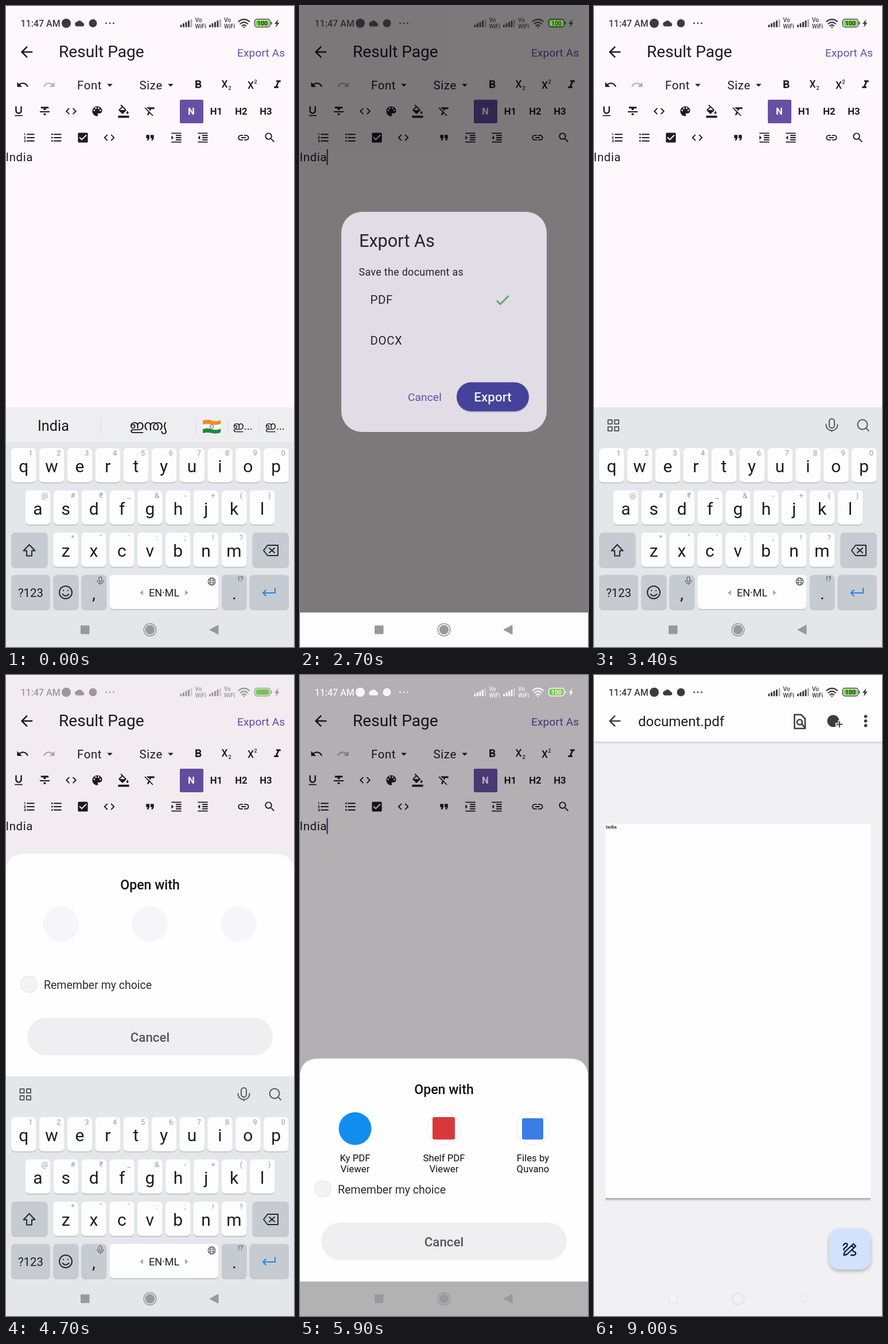
These frames come from a looping animation (502x1115 px, 9.1 s). An HTML page:

```html
<!DOCTYPE html>
<html lang="en">
<head>
<meta charset="utf-8">
<title>Export document</title>
<style>
html, body { margin: 0; width: 100%; height: 100%; overflow: hidden; background: #fef8fd; }
svg { display: block; width: 502px; height: 1115px; font-family: Roboto, "Noto Sans", sans-serif; fill: #1d1b20; }
.mid { text-anchor: middle; }
.med { font-weight: 500; }
.body { font-size: 20.4px; letter-spacing: .64px; }
.btn { font-size: 19.1px; letter-spacing: .13px; fill: #5f4fa8; }
.line { fill: none; stroke: currentColor; stroke-linecap: round; stroke-linejoin: round; }
.anim { animation: 9100ms linear infinite; }
.step { animation-timing-function: step-end; }

#status { animation-name: status; fill: currentColor; }
#pill { animation-name: pill; }
#caret { animation-name: caret; }
#scrim { animation-name: scrim; }
#dialog { animation-name: dialog; }
#dialogPos { animation-name: dialogPos; }
#ripple { animation-name: ripple; }
#tick { animation-name: tick; }
#dim { animation-name: dim; }
#sheet { animation-name: sheet; }
#apps { animation-name: apps; }
#viewer { animation-name: viewer; }
#page { animation-name: page; }
#keyboard { animation-name: keyboard; }
#suggest { animation-name: suggest; }
#tools { animation-name: tools; }
#nav { animation-name: nav; }

@keyframes status {
  0%, 1.1% { color: #3c3a3d; }
  3.1%, 28.6% { color: #232224; }
  31%, 49.5% { color: #3c3a3d; }
  51.65% { color: #9a989c; }
  55%, 66% { color: #f6f5f7; }
  69%, 100% { color: #3c3a3d; }
}
@keyframes pill { 0%, 1.1% { opacity: 0; } 2.2%, 5% { opacity: 1; } 8.8%, 100% { opacity: 0; } }
@keyframes caret {
  0% { opacity: 0; } 28.57% { opacity: 1; } 37.36% { opacity: 0; }
  42.86% { opacity: 1; } 48.35% { opacity: 0; } 53.85%, 100% { opacity: 1; }
}
@keyframes scrim {
  0%, 1.1% { opacity: 0; } 3.1%, 28.57% { opacity: 1; }
  29.67% { opacity: .96; } 31.3%, 100% { opacity: 0; }
}
@keyframes dialog {
  0%, 1.4% { opacity: 0; } 3.1%, 28.57% { opacity: 1; }
  29.67% { opacity: .92; } 31.1%, 100% { opacity: 0; }
}
@keyframes dialogPos {
  0%, 4.6% { transform: translateY(0); animation-timing-function: ease-out; }
  6.1%, 100% { transform: translateY(86px); }
}
@keyframes ripple { 0%, 10.9% { opacity: 0; } 12.1%, 14.3% { opacity: 1; } 17.6%, 100% { opacity: 0; } }
@keyframes tick { 0% { transform: translateY(0); } 13.19%, 100% { transform: translateY(-71.5px); } }
@keyframes keyboard {
  0%, 2.2% { transform: translateY(0); animation-timing-function: ease-in; }
  4.396% { transform: translateY(382.5px); animation-timing-function: ease-out; }
  5%, 31.3% { transform: translateY(417px); animation-timing-function: ease-out; }
  34.8%, 52.2% { transform: translateY(0); animation-timing-function: ease-in-out; }
  55.5%, 100% { transform: translateY(417px); }
}
@keyframes suggest { 0% { opacity: 1; } 1.09%, 100% { opacity: 0; } }
@keyframes tools { 0% { opacity: 0; } 1.09%, 100% { opacity: 1; } }
@keyframes dim {
  0%, 49.5% { opacity: 0; } 51.65% { opacity: .17; }
  55%, 65.3% { opacity: 1; } 69%, 100% { opacity: 0; }
}
@keyframes sheet {
  0%, 48.35% { transform: translateY(450px); animation-timing-function: ease-out; }
  51.4%, 52.2% { transform: translateY(-356px); animation-timing-function: ease-in-out; }
  55.8%, 65.3% { transform: translateY(0); animation-timing-function: ease-in; }
  68.6%, 100% { transform: translateY(450px); }
}
@keyframes apps { 0%, 52.7% { opacity: 0; } 54.5%, 100% { opacity: 1; } }
@keyframes viewer {
  0%, 65.9% { transform: translateX(520px); animation-timing-function: cubic-bezier(.2, .7, .2, 1); }
  70.5%, 100% { transform: translateX(0); }
}
@keyframes page { 0%, 74.5% { opacity: 0; } 75.8%, 100% { opacity: 1; } }
@keyframes nav {
  0%, 67% { fill: #99989b; stroke: #99989b; }
  70.5%, 100% { fill: #f3f2f5; stroke: #e1e0e3; }
}
</style>
</head>
<body>
<svg viewBox="0 0 502 1115" xmlns="http://www.w3.org/2000/svg">
  <defs>
    <clipPath id="above"><path d="M0 0h502v1055H0z"/></clipPath>
    <linearGradient id="shade" x2="0" y2="1">
      <stop stop-color="#000" stop-opacity=".16"/><stop offset="1" stop-color="#000" stop-opacity="0"/>
    </linearGradient>
    <filter id="soft" x="-30%" y="-30%" width="160%" height="170%">
      <feDropShadow dx="0" dy="3" stdDeviation="3" flood-opacity=".28"/>
    </filter>
  </defs>

  <!-- editor -->
  <path fill="#fef8fd" d="M0 0h502v1115H0z"/>
  <rect id="pill" class="anim" x="388" y="55" width="120" height="51" rx="25.5" fill="#6750a4" fill-opacity=".13"/>
  <text x="92" y="89" font-size="28.1">Result Page</text>
  <text class="btn" x="403" y="87.5">Export As</text>
  <text class="body" x="124" y="145">Font</text>
  <text class="body" x="232.5" y="145">Size</text>
  <g class="med" font-size="17.5"><text x="375.5" y="142">X</text><text x="421" y="144">X</text></g>
  <g class="med" font-size="9"><text x="387.5" y="145.500">2</text><text x="432.500" y="134.500">2</text></g>
  <rect x="303" y="163" width="41" height="41" rx="2" fill="#6750a4"/>
  <g class="mid" font-size="16.8" font-weight="700">
    <text x="323" y="188.500" fill="#fff">N</text><text x="366.500" y="188.500">H1</text>
    <text x="410" y="188.500">H2</text><text x="453" y="188.500">H3</text>
  </g>
  <g id="icons"></g>
  <text class="body" x="-.5" y="270">India</text>
  <rect id="caret" class="anim step" x="46.300" y="249" width="2.400" height="27.500" fill="#5443a0"/>

  <!-- export dialog -->
  <path id="scrim" class="anim" fill="#000" fill-opacity=".54" d="M0 0h502v1055H0z"/>
  <g id="dialog" class="anim"><g id="dialogPos" class="anim">
    <rect x="72" y="272" width="358" height="383" rx="36" fill="#ede6f2"/>
    <text x="103" y="333" font-size="30.65">Export As</text>
    <text x="102.500" y="383" font-size="17.9" letter-spacing=".32">Save the document as</text>
    <path id="ripple" class="anim" fill="#000" fill-opacity=".08" d="M103 389h296v71.500h-296z"/>
    <text class="body" x="122.500" y="431.500">PDF</text>
    <text class="body" x="122.500" y="503">DOCX</text>
    <g id="tick" class="anim step"></g>
    <text class="btn" x="188" y="601">Cancel</text>
    <rect x="273" y="570.500" width="126" height="50.500" rx="25.200" fill="#000" opacity=".16"/>
    <rect x="273" y="568.500" width="126" height="50.500" rx="25.200" fill="#3f3d9e"/>
    <text class="mid med" x="336" y="602" font-size="22.3" letter-spacing=".13" fill="#fff">Export</text>
  </g></g>
  <path fill="#fefdfe" d="M0 1055h502v60H0z"/>

  <!-- open-with sheet -->
  <path id="dim" class="anim" fill="#000" fill-opacity=".295" d="M0 0h502v1115H0z"/>
  <g clip-path="url(#above)"><g id="sheet" class="anim">
    <path fill="#fefdff" d="M0 1060V699q0-32 34-32h434q34 0 34 32v361z"/>
    <text class="mid med" x="251" y="728.500" font-size="23.1" fill="#111">Open with</text>
    <g fill="#f5f5fa"><circle cx="96" cy="789" r="31"/><circle cx="250.500" cy="789" r="31"/><circle cx="405.500" cy="789" r="31"/></g>
    <g id="apps" class="anim">
      <path fill="#fefdff" d="M60 755h385v70H60z"/>
      <circle cx="96" cy="789" r="28.500" fill="#118df0"/>
      <g fill="#fff" stroke="#f0eff3" stroke-width="1.500"><circle cx="250.500" cy="789" r="28.500"/><circle cx="405.500" cy="789" r="28.500"/></g>
      <rect x="231" y="769" width="39" height="39" rx="3" fill="#d8383a"/>
      <rect x="387" y="771" width="37" height="37" rx="3" fill="#3b7be8"/>
      <g class="mid" font-size="16.8" fill="#111">
        <text x="96" y="846">Ky PDF</text><text x="96" y="865">Viewer</text>
        <text x="251" y="846">Shelf PDF</text><text x="251" y="865">Viewer</text>
        <text x="406" y="846">Files by</text><text x="406" y="865">Quvano</text>
      </g>
    </g>
    <circle cx="40" cy="894" r="14.300" fill="#f3f2f4" stroke="#dedde0"/>
    <text x="66" y="901.500" font-size="19.5" fill="#2c2b2e">Remember my choice</text>
    <rect x="37" y="952.500" width="428" height="65" rx="32.500" fill="#efeef0"/>
    <text class="mid med" x="251" y="993.500" font-size="22.3" fill="#555458">Cancel</text>
  </g></g>

  <!-- document viewer -->
  <g id="viewer" class="anim">
    <path fill="#f1f0f3" d="M0 0h502v1115H0z"/>
    <path fill="#fefdfe" d="M0 0h502v116H0z"/>
    <path fill="url(#shade)" d="M0 116h502v4H0z"/>
    <text x="77" y="88.500" font-size="24.1">document.pdf</text>
    <g id="viewerIcons"></g>
    <g fill="#3e3c40">
      <circle cx="417" cy="80" r="10.500"/>
      <path stroke="#fefdfe" stroke-width="1.500" d="M426 79.500h3.500v4.500h4.500v3.500h-4.500v4.500h-3.500v-4.500h-4.500v-3.500h4.500z"/>
      <circle cx="473.500" cy="72" r="2.800"/><circle cx="473.500" cy="80" r="2.800"/><circle cx="473.500" cy="88" r="2.800"/>
    </g>
    <g id="page" class="anim">
      <path fill="#aaa9ad" d="M20 910h462v2H20z"/><path fill="url(#shade)" d="M20 912h462v4H20z"/>
      <path fill="#fefdfe" d="M20 259h462v651H20z"/>
      <text x="20.500" y="267" font-size="7.2" font-weight="700" font-family="Noto Serif, serif">India</text>
      <rect x="410" y="963" width="72" height="71" rx="18" fill="#d2e2fc" filter="url(#soft)"/>
      <g class="line" color="#08154d" stroke-width="2.300">
        <path d="M435.500 1009l1.200-5 15.500-14.500 4 4-15.500 14.500zM449 992.500l4 4"/>
        <path d="M434.500 992c3-5 8-4 7 0s-8 5-6 8M448 1009c6 1 9-1 8-4s-5-1-5-4"/>
      </g>
    </g>
  </g>

  <!-- keyboard -->
  <g id="keyboard" class="anim">
    <path fill="#e4e6e9" d="M0 698h502v417H0z"/>
    <g id="suggest" class="anim step">
      <path fill="#eeeef0" d="M0 698h502v61H0z"/>
      <path stroke="#dcdde0" d="M165.500 715v30M330.500 715v30M386.500 715v30M441.500 715v30"/>
      <g class="mid" font-family="Roboto, Noto Sans Malayalam, Noto Sans, sans-serif">
        <text x="82.500" y="739" font-size="25.3">India</text>
        <text x="248" y="738" font-size="25">ഇന്ത്യ</text>
        <text x="413" y="737" font-size="19">ഇ...</text><text x="469" y="737" font-size="19">ഇ...</text>
      </g>
      <path fill="#f7f7f7" d="M343 721q8-3 16 0t15-1v22q-7 3-15 1t-16 0z"/>
      <path fill="#f58b1f" d="M343 721q8-3 16 0t15-1v7q-7 3-15 1t-16 0z"/>
      <path fill="#1c8a3a" d="M343 736q8-3 16 0t15-1v7q-7 3-15 1t-16 0z"/>
      <circle cx="358.500" cy="731.500" r="3" fill="none" stroke="#2b3c9a"/>
    </g>
    <g id="tools" class="anim step">
      <g class="line" color="#58595d" stroke-width="2">
        <path d="M24.500 720h7v7h-7zM36 720h7v7h-7zM24.500 732h7v7h-7zM36 732h7v7h-7z"/>
        <rect x="410" y="718" width="9" height="16" rx="4.500"/><path d="M404.500 728c0 14 20 14 20 0M414.500 738.500v2"/>
        <circle cx="468" cy="728" r="8.500"/><path d="M474 734l5 5"/>
      </g>
    </g>
    <g id="keys"></g>
    <g class="line" color="#28292d" stroke-width="2">
      <path d="M40.500 937l10 10.500h-5.500v9h-9v-9h-5.500z"/>
      <path d="M456 938h18v18h-18l-7-9zM459 943l9 8M468 943l-9 8"/>
      <circle cx="104" cy="1020" r="11"/><path d="M98.500 1023q5.500 6.500 11 0M100 1016.500v.5M108 1016.500v.5"/>
      <path color="#2583e4" d="M469 1013v8h-21M453 1016l-5 5 5 5"/>
    </g>
    <g class="line" color="#55565a" stroke-width="1.200">
      <rect x="162" y="993" width="5" height="8" rx="2.500"/><path d="M159 999c0 7 11 7 11 0M164.500 1004v2.500"/>
      <circle cx="358.500" cy="1001" r="6.300"/><ellipse cx="358.500" cy="1001" rx="2.800" ry="6.300"/><path d="M352.500 999h12M352.500 1003h12"/>
    </g>
    <path fill="#a9abaf" d="M239 1016v9l-6-4.500zM312 1016v9l6-4.500z"/>
    <g class="mid">
      <text x="43" y="1028" font-size="20.4">?123</text><text x="275.500" y="1027" font-size="18">EN·ML</text>
      <text x="153" y="1032" font-size="30">,</text><text x="398" y="1032" font-size="30">.</text>
      <text x="409" y="1001" font-size="13" fill="#55565a">!?</text>
    </g>
  </g>

  <!-- navigation bar -->
  <g id="nav" class="anim" stroke-width="1">
    <path d="M130.500 1078h14.500v14h-14.500z"/>
    <circle cx="251" cy="1085" r="10.800" style="fill:none" stroke-width="1.500"/><circle cx="251" cy="1085" r="7.800"/>
    <path d="M370 1077v16l-15-8z"/>
  </g>

  <!-- status bar -->
  <g id="status" class="anim">
    <text class="med" x="25.500" y="35.500" font-size="16">11:47 AM</text>
    <circle cx="105" cy="30" r="8"/>
    <path d="M124.500 35.500a4 4 0 0 1-.5-8 5.500 5.500 0 0 1 9.500 1.500 3.300 3.300 0 0 1 0 6.500z"/>
    <circle cx="151.500" cy="30" r="7"/>
    <circle cx="174.500" cy="30" r="1.400"/><circle cx="181" cy="30" r="1.400"/><circle cx="187.500" cy="30" r="1.400"/>
    <g id="signals"></g>
    <g class="line" stroke-width="2.300"><path d="M405.500 27c5.500-5 13-5 18.500 0M408.500 31c4-3.500 8.500-3.500 12.500 0M411.500 34.500c2-1.800 4.500-1.800 6.500 0"/></g>
    <circle cx="414.800" cy="37" r="1.300"/>
    <rect x="433.500" y="23" width="27" height="13.500" rx="4" fill="none" stroke="currentColor" stroke-width="1.500"/>
    <rect x="435.500" y="25" width="23" height="9.500" rx="2.500" fill="#6bd436"/>
    <path d="M462 27.500h1.500v4.500H462zM474.500 23l-6.500 8h3.500l-1.500 6.500 6.500-8.500h-3.500z"/>
    <text class="mid" x="447" y="33.500" font-size="10.500" font-weight="700">100</text>
  </g>
</svg>

<script>
const $ = id => document.getElementById(id);
const icon = (x, y, d, fill = '#1d1b20', k = .957) =>
  `<path fill="${fill}" transform="translate(${x} ${y}) scale(${k}) translate(-12 -12)" d="${d}"/>`;

const drop = 'M7 10l5 5 5-5z';
const code = 'M9.4 16.6L4.8 12l4.6-4.6L8 6l-6 6 6 6 1.400-1.400zm5.200 0l4.600-4.600-4.600-4.600L16 6l6 6-6 6-1.400-1.400z';
const back = 'M20 11H7.830l5.590-5.590L12 4l-8 8 8 8 1.410-1.410L7.830 13H20v-2z';
const rows = 'M3 21h18v-2H3zM3 3v2h18V3zM11 17h10v-2H11zm0-8h10V7H11zm0 4h10v-2H11z';
const dot = (x, y, r = 1.5) => `M${x - r} ${y}a${r} ${r} 0 1 0 ${2 * r} 0a${r} ${r} 0 1 0 ${-2 * r} 0z`;
const bars = 'M7 19h14v-2H7zm0-6h14v-2H7zm0-8v2h14V5z';

$('icons').innerHTML = [
  [29, 137, 'M12.5 8c-2.650 0-5.050.99-6.900 2.600L2 7v9h9l-3.620-3.620c1.390-1.160 3.160-1.880 5.120-1.880 3.540 0 6.550 2.310 7.600 5.500l2.370-.78C21.080 11.030 17.150 8 12.500 8z'],
  [75, 137, 'M18.4 10.6C16.550 8.990 14.150 8 11.500 8c-4.650 0-8.580 3.030-9.960 7.220L3.900 16c1.050-3.190 4.050-5.500 7.600-5.500 1.950 0 3.730.72 5.120 1.880L13 16h9V7z', '#b3afb5'],
  [181, 137.5, drop], [287, 137.5, drop],
  [335, 137, 'M15.6 10.790c.97-.67 1.650-1.770 1.650-2.790 0-2.260-1.750-4-4-4H7v14h7.040c2.090 0 3.710-1.700 3.710-3.790 0-1.520-.86-2.820-2.150-3.420zM10 6.500h3c.83 0 1.500.67 1.500 1.500s-.67 1.500-1.500 1.500h-3zm3.500 9H10v-3h3.500c.83 0 1.500.67 1.500 1.500s-.67 1.500-1.500 1.500z'],
  [473, 137, 'M10 4v3h2.210l-3.420 8H6v3h8v-3h-2.210l3.420-8H18V4z'],
  [22, 183, 'M12 17c3.310 0 6-2.690 6-6V3h-2.500v8c0 1.930-1.570 3.500-3.500 3.500S8.500 12.930 8.500 11V3H6v8c0 3.310 2.690 6 6 6zm-7 2v2h14v-2z'],
  [67.5, 183, 'M10 19h4v-3h-4zM5 4v3h5v3h4V7h5V4zM3 14h18v-2H3z'],
  [113.5, 183, code],
  [159, 183, 'M12 3c-4.970 0-9 4.030-9 9s4.030 9 9 9c.83 0 1.500-.67 1.500-1.500 0-.39-.15-.74-.39-1.010-.23-.26-.38-.61-.38-.99 0-.83.67-1.500 1.500-1.500H16c2.760 0 5-2.240 5-5 0-4.420-4.030-8-9-8z'],
  [159, 183, dot(6.5, 10.5) + dot(9.5, 6.5) + dot(14.5, 6.5) + dot(17.5, 10.5), '#fef8fd'],
  [205, 183, 'M16.560 8.940L7.620 0 6.210 1.410l2.380 2.380-5.150 5.150c-.59.59-.59 1.540 0 2.120l5.500 5.500c.59.59 1.540.59 2.120 0l5.500-5.500c.59-.58.59-1.530 0-2.120zM5.210 10L10 5.210 14.790 10zM19 11.500s-2 2.170-2 3.500c0 1.100.9 2 2 2s2-.9 2-2c0-1.330-2-3.500-2-3.500zM2 20h20v4H2z'],
  [251, 183, 'M3.270 5L2 6.270l6.970 6.970L6.500 19h3l1.570-3.660L16.730 21 18 19.730zM6 5v.18L8.820 8h2.400l-.72 1.680 2.100 2.100L14.210 8H20V5z'],
  [41, 229, 'M2 17h2v.5H3v1h1v.5H2v1h3v-4H2zm1-9h1V4H2v1h1zm-1 3h1.800L2 13.100v.9h3v-1H3.200L5 10.900V10H2z' + bars],
  [88, 229, dot(4, 6) + dot(4, 12) + dot(4, 18) + bars],
  [134, 229, 'M19 3H5c-1.110 0-2 .9-2 2v14c0 1.100.89 2 2 2h14c1.110 0 2-.9 2-2V5c0-1.100-.89-2-2-2zm-9 14l-5-5 1.410-1.410L10 14.170l7.590-7.590L19 8z'],
  [180, 229, code],
  [251, 229, 'M6 17h3l2-4V7H5v6h3zm8 0h3l2-4V7h-6v6h3z'],
  [297, 229, rows + 'M3 8v8l4-4z'], [343, 229, rows + 'M3 12l4 4V8z'],
  [414, 229, 'M3.900 12c0-1.710 1.390-3.100 3.100-3.100h4V7H7c-2.760 0-5 2.240-5 5s2.240 5 5 5h4v-1.900H7c-1.710 0-3.100-1.390-3.100-3.100zM8 13h8v-2H8zm9-6h-4v1.900h4c1.710 0 3.100 1.390 3.100 3.100s-1.390 3.100-3.100 3.100h-4V17h4c2.760 0 5-2.240 5-5s-2.240-5-5-5z'],
  [460, 229, 'M15.500 14h-.79l-.28-.27C15.410 12.590 16 11.110 16 9.500 16 5.910 13.090 3 9.500 3S3 5.910 3 9.500 5.910 16 9.500 16c1.610 0 3.090-.59 4.230-1.570l.27.28v.79l5 4.990L20.490 19zm-6 0C7.010 14 5 11.990 5 9.500S7.010 5 9.500 5 14 7.010 14 9.500 11.990 14 9.500 14z'],
  [36, 80, back, '#1d1b20', 1.277]
].map(a => icon(...a)).join('');

$('tick').innerHTML = icon(353, 497, 'M9 16.170L4.830 12l-1.420 1.410L9 19 21 7l-1.410-1.410z', '#43a852', 1.277);

$('viewerIcons').innerHTML = icon(36, 80, back, '#3e3c40', 1.277) +
  `<g class="line" color="#3e3c40" stroke-width="2.600"><path d="M349.500 69h11.500l7 7v17h-18.500z"/>
   <circle cx="358.500" cy="82" r="4.500"/><path d="M362 85.500l5.500 5.500"/></g>`;

// Keyboard keys: letters with a small hint in the corner
const key = (x, y, w, fill = '#fdfdfe') =>
  `<rect x="${x}" y="${y + 2}" width="${w}" height="59.500" rx="6.500" fill="#c3c6cb"/>
   <rect x="${x}" y="${y}" width="${w}" height="59.500" rx="6.500" fill="${fill}"/>`;
const esc = c => c === '&' ? '&amp;' : c;
const letters = (text, hints, x0, y) => [...text].map((c, i) => {
  const x = x0 + i * 48.9;
  return key(x, y, 43.5) +
    `<text class="mid" x="${x + 21.7}" y="${y + 42}" font-size="30">${c}</text>
     <text class="mid" x="${x + 34}" y="${y + 13}" font-size="13" fill="#97999d">${esc(hints[i])}</text>`;
}).join('');
const gray = '#c6cad1';
$('keys').innerHTML =
  letters('qwertyuiop', '1234567890', 9, 769) +
  letters('asdfghjkl', '@#₹_&-+()', 33.7, 842.5) +
  letters('zxcvbnm', '*"\':;!?', 82.4, 916) +
  key(9, 916, 63.5, gray) + key(429.5, 916, 63.5, gray) +
  key(9, 989.5, 68, gray) + key(82.4, 989.5, 44, gray) + key(131.3, 989.5, 44, gray) +
  key(180.5, 989.5, 190) + key(376, 989.5, 43.5, gray) + key(424.5, 989.5, 68.5, gray);

$('signals').innerHTML = [303.5, 354].map(x => [0, 1, 2, 3, 4].map(i => {
  const h = 4.5 + i * 2.4;
  return `<rect x="${x + i * 4.500}" y="${37 - h}" width="3" height="${h}" rx="1" opacity="${i < 4 ? 1 : .4}"/>`;
}).join('') + `<g class="med" font-size="10"><text x="${x + 26}" y="28">Vo</text><text x="${x + 26}" y="38.500">WiFi</text></g>`).join('');
</script>
</body>
</html>
```
